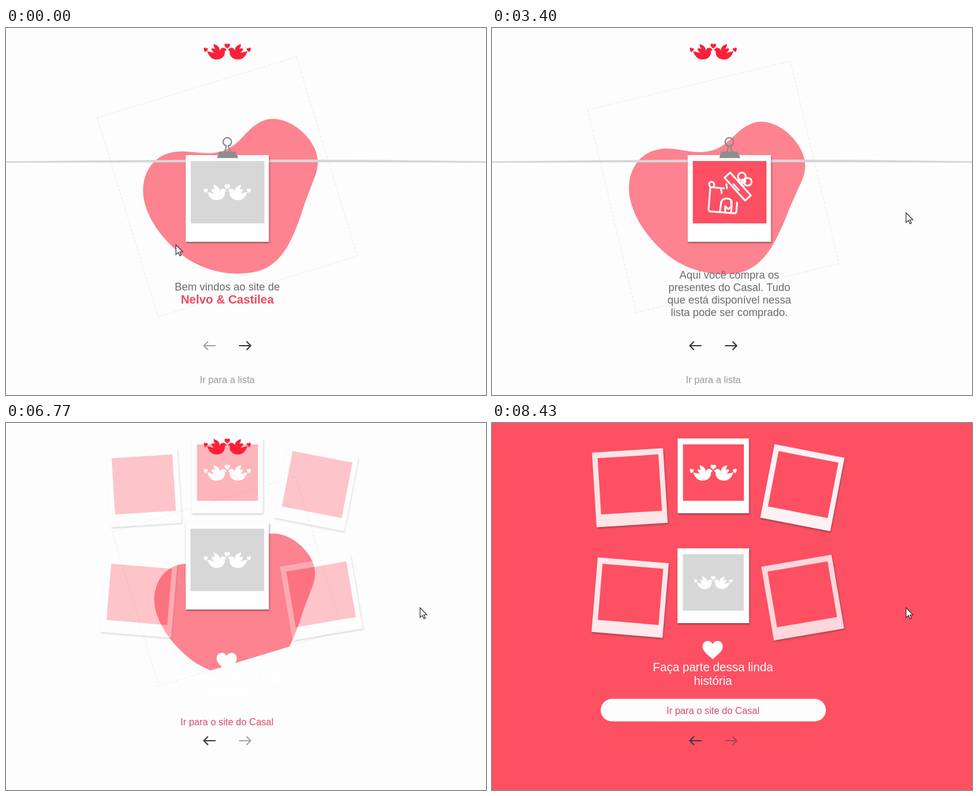
Recreate the animation shown at these times as an HTML page. Size 808 by 618 pixels, loop 8460 ms.

```html
<!DOCTYPE html>
<html lang="pt">
<head>
<meta charset="utf-8">
<style>
  html, body { margin: 0; width: 100%; height: 100%; overflow: hidden; background: #fdfdfd; }
  svg { display: block; width: 808px; height: 618px; font: 18px "Liberation Sans", Arial, sans-serif; }
  text { text-anchor: middle; fill: #6a6a6e; }
  .strong { font-weight: bold; font-size: 20px; fill: #ee4a60; }
  .store { font-weight: bold; font-size: 19px; fill: #0a86de; }
  .light { fill: #fff; }
  .small { font-size: 16px; }
  .shadow { filter: drop-shadow(1.5px 2px 1.5px rgba(50, 40, 50, .5)); }
  .line { fill: none; stroke-linecap: round; stroke-linejoin: round; }
</style>
</head>
<body>
<svg id="stage" viewBox="0 0 808 618"></svg>
<script>
const LOOP = 8460, CENTER = 372.5, WIDTH = 808;
const pink = '#fc838f', red = '#fd5062', grey = '#d7d7d8', paper = '#fefefe';
const STARTS = [1108, 2940, 4405, 5900];
const ANGLES = [-17, 0, -17, 0, -17];

// x, y, rotation, sideways drift, opacity keys at 6770, 7770 and 8430 ms
const FRAMES = [
  [232, 109, -3.6, 0, .32, .7, .85],
  [CENTER, 89, 0, 0, .42, .97, 1],
  [522.5, 109, 11, 0, .32, .87, .93],
  [232.5, 294, 4.8, -9, .32, .78, .88],
  [523, 294, -9.7, 8, .32, .65, .78]
];

const use = (id, x, y, scale, fill) =>
  `<use href="#${id}" transform="translate(${x} ${y}) scale(${scale})" fill="${fill}"/>`;
const lines = (y, ...rows) =>
  rows.map((row, i) => `<text x="${CENTER}" y="${y + i * 21}">${row}</text>`).join('');
const clip = `<g transform="translate(${CENTER} 0)">
  <path class="line" d="M-4 208L-1.5 198.5A7 7 0 1 1 1.5 198.5L5 208" stroke="#858588" stroke-width="2"/>
  <path d="M-14 208H14L18.5 219H-17Z" fill="#8e8e91"/></g>`;
const card = (fill, content, text) => `<g class="slide">
  <rect class="shadow" x="302.5" y="214" width="140" height="146" fill="${paper}"/>
  <rect x="311" y="224" width="124" height="105" fill="${fill}"/>
  ${clip}${content}${text}</g>`;
const doves = use('doves', CENTER, 277, 1, paper);

const gift = `<g class="line" transform="translate(${CENTER} 277)" stroke="#fff" stroke-width="3">
  <path d="M-9-7L-32-9L-35 28Q-35 32-31 32L8 35Q12 35 12 31L13 17M-32-9Q-37-17-30-18Q-24-17-26-11M-14-7L-13 1M-5-14L-4-7M-16 33L-14 18Q-13 10-4 10Q5 11 4 18L3 34M-7 34V23L-2 28L3 24V13"/>
  <rect x="-26" y="-6.5" width="52" height="13" transform="translate(14 -10) rotate(48)"/>
  <path d="M7-14L16-4M14-21L24-10"/>
  <circle cx="21" cy="-27" r="6.5"/><circle cx="31" cy="-18" r="6.5"/><circle cx="24" cy="-19" r="3"/></g>`;

const check = `<g transform="translate(${CENTER} 343)">${use('heart', 0, 0, '.8 .68', '#f5506a')}
  <path class="line" d="M-5 0L-1 4L6-4" stroke="#fff" stroke-width="3"/></g>`;

const arrow = (id, x, flip) => `<path id="${id}" class="line" transform="translate(${x} 535) scale(${flip} 1)"
  d="M-9.5 0H9.5M3-6.5L9.5 0L3 6.5" stroke="#3c3a3e" stroke-width="2.2"/>`;

const stage = document.getElementById('stage');
stage.innerHTML = `
<defs>
  <path id="heart" d="M0 15.5C-6 9-17 3-17-6C-17-12-13-15.5-8.5-15.5C-4-15.5-1-13 0-10C1-13 4-15.5 8.5-15.5C13-15.5 17-12 17-6C17 3 6 9 0 15.5Z"/>
  <g id="dove">
    <path d="M-1-3L-4-6C-8-8-12-6-13-1C-12-7-16-11-23-13C-23-9-22-7-20-5C-23-6-25-6-27-5C-26-2-24 0-22 2L-34-1C-31 7-27 13-18 13C-9 13-3 7-4-1Z"/>
    <use href="#heart" transform="translate(-36.5 -3) rotate(12) scale(.2 .24)"/>
  </g>
  <g id="doves">
    <use href="#dove"/><use href="#dove" transform="scale(-1 1)"/>
    <use href="#heart" transform="translate(0 -9.5) scale(.28)"/>
  </g>
  <clipPath id="cut"><rect id="cutBox" x="-176" y="-176" width="352"/></clipPath>
</defs>
<rect width="808" height="618" fill="#fdfdfd"/>
<g id="blob" clip-path="url(#cut)">
  <rect id="dashes" x="-175.5" y="-175.5" width="351" fill="none" stroke="#e2e2e4" stroke-dasharray="4 3"/>
  <path fill="${pink}" d="M-79-83C-45-83-25-60 10-60C45-60 60-89 96-89C130-87 160-45 160-11C160 4 155 14 148 24C128 50 118 62 106 80C85 108 55 151 10 151C-40 149-85 120-108 85C-130 52-141 20-141-11C-141-50-115-83-79-83Z"/>
</g>
<rect id="redFill" width="808" height="618" fill="${red}"/>
<path id="string" d="M0 224.5Q200 222 404 221.5T808 224.5V227Q600 226 404 226T0 227Z" fill="#d6d4da"/>
${FRAMES.map((f, i) => `<g class="frame">
  <rect class="shadow" x="-60" y="-63" width="120" height="126" fill="${paper}"/>
  <rect x="-51" y="-53" width="102.5" height="95" fill="${red}"/>
  ${i === 1 ? use('doves', 0, -5, 1, paper) : ''}</g>`).join('')}
<g id="header">${use('doves', CENTER, 40, 1, '#f9213a')}</g>
${card(grey, doves, `<text x="${CENTER}" y="442">Bem vindos ao site de</text>
  <text class="strong" x="${CENTER}" y="464">Nelvo &amp; Castilea</text>`)}
${card(red, `<text class="light" x="${CENTER}" y="277" style="font-weight:bold;font-size:28px">-599</text>
  <text class="light" x="${CENTER}" y="299">dias</text>${check}`,
  lines(444, 'Faltam <tspan class="strong">-599 dias</tspan> para o', 'grande dia!'))}
${card(red, gift, lines(422, 'Aqui você compra os', 'presentes do Casal. Tudo', 'que está disponível nessa', 'lista pode ser comprado.'))}
${card(grey, doves, lines(433, 'O <tspan class="store">Zumelo</tspan> notifica o casal do', 'seu presente. Com certeza,', 'ficarão muito felizes!'))}
<g class="slide">
  <rect id="lastPaper" class="shadow" fill="${paper}"/><rect id="lastPhoto" fill="${grey}"/>
  <use id="lastDoves" href="#doves" fill="${paper}"/>
</g>
<g id="closing">
  ${use('heart', 371.5, 382.5, 1, '#fff')}
  <g style="font-size:20px"><text class="light" x="372" y="417.5">Faça parte dessa linda</text>
  <text class="light" x="372" y="440.5">história</text></g>
  <rect x="183" y="464.5" width="379" height="38" rx="19" fill="#fdfdfd"/>
  <text class="small" x="372" y="489.5" style="fill:#d84a68">Ir para o site do Casal</text>
</g>
${arrow('back', 342.5, -1)}${arrow('next', 402.5, 1)}
<text id="toList" class="small" x="372.5" y="598" style="fill:#98989b">Ir para a lista</text>
<path id="cursor" d="M0 0V16.5L4 13L6.6 18.6L9 17.5L6.5 12H11.5Z" fill="#fff" stroke="#302e32" stroke-width="1.2"/>`;

const $ = id => document.getElementById(id);
const all = name => [...stage.querySelectorAll(name)];
const slides = all('.slide'), frames = all('.frame');
const set = (el, attrs) => { for (const k in attrs) el.setAttribute(k, attrs[k]); };
const clamp = v => Math.min(1, Math.max(0, v));
const mix = (a, b, p) => a + (b - a) * p;
const ramp = (t, from, to) => clamp((t - from) / (to - from));
const smooth = v => v * v * (3 - 2 * v);

// CSS "ease": cubic-bezier(.25, .1, .25, 1)
function ease(x) {
  if (x <= 0 || x >= 1) return clamp(x);
  let lo = 0, hi = 1;
  const at = (s, a, b) => 3 * (1 - s) ** 2 * s * a + 3 * (1 - s) * s * s * b + s ** 3;
  for (let i = 0; i < 22; i++) {
    const mid = (lo + hi) / 2;
    if (at(mid, .25, .25) < x) lo = mid; else hi = mid;
  }
  return at(lo, .1, 1);
}

function keyed(t, keys, curve = v => v) {
  const i = keys.findIndex(k => k[0] > t);
  if (i < 0) return keys[keys.length - 1][1];
  if (i === 0) return keys[0][1];
  const [a, b] = [keys[i - 1], keys[i]];
  return mix(a[1], b[1], curve((t - a[0]) / (b[0] - a[0])));
}

function drawBlob(t) {
  let angle = ANGLES[0];
  STARTS.forEach((s, i) => angle += (ANGLES[i + 1] - ANGLES[i]) * ease((t - s + 30) / 1000));
  const shrink = smooth(ramp(t, 6150, 6770));
  const scale = keyed(t, [[6150, 1], [6770, .92], [6860, .92], [7450, 6.5]], smooth);
  const height = mix(351, 294, shrink);
  set($('blob'), { transform: `translate(${CENTER + 7.5 * shrink} ${267.5 + 24 * shrink}) rotate(${angle}) scale(${scale})` });
  set($('dashes'), { height });
  set($('cutBox'), { height: height + 1 });
  set($('redFill'), { opacity: smooth(ramp(t, 7800, 8380)) });
}

function drawFrames(t, settle) {
  FRAMES.forEach(([x, y, turn, drift, a, b, c], i) => set(frames[i], {
    transform: `translate(${x + drift * (1 - settle)} ${y}) rotate(${turn})`,
    opacity: keyed(t, [[6080, 0], [6770, a], [7770, b], [8430, c]])
  }));
}

function drawLastCard(t, settle) {
  const lift = 46 * smooth(ramp(t, 5950, 6550));
  const width = mix(140, 120.5, settle), height = mix(146, 126, settle);
  const middle = mix(287 - lift, 274, 1 - (1 - settle) ** 1.5);
  const photoWidth = mix(124, 102.5, settle), top = middle - height / 2;
  set($('lastPaper'), { x: CENTER - width / 2, y: top, width, height });
  set($('lastPhoto'), { x: CENTER - photoWidth / 2, y: top + 10, width: photoWidth, height: mix(105, 95, settle) });
  set($('lastDoves'), { transform: `translate(${CENTER} ${top + mix(63, 58, settle)}) scale(${mix(1, .82, settle)})` });
}

function draw(t) {
  const position = STARTS.reduce((sum, s) => sum + ease((t - s) / 600), 0);
  const settle = smooth(ramp(t, 6770, 8430));
  slides.forEach((el, i) => set(el, {
    transform: `translate(${(i - position) * WIDTH} 0)`,
    visibility: Math.abs(i - position) < 1 ? 'visible' : 'hidden'
  }));
  drawBlob(t);
  drawFrames(t, settle);
  drawLastCard(t, settle);

  set($('closing'), { transform: `translate(0 ${20 * (1 - settle)})`, opacity: ramp(t, 6100, 6650) });
  set($('string'), { opacity: 1 - ramp(t, 5950, 6500) });
  set($('header'), { opacity: 1 - ramp(t, 6790, 7100) });
  set($('toList'), { opacity: 1 - ramp(t, 5900, 6250) });
  set($('back'), { opacity: mix(.45, 1, ramp(t, STARTS[0], STARTS[0] + 200)) });
  set($('next'), { opacity: mix(1, .45, ramp(t, STARTS[3], STARTS[3] + 200)) });

  const x = keyed(t, [[0, 286], [800, 398], [1150, 398], [1630, 370], [1900, 420], [2770, 697]], smooth);
  const y = keyed(t, [[0, 365], [800, 529], [1150, 529], [1630, 340], [1900, 572], [2770, 311]], smooth);
  set($('cursor'), { transform: `translate(${x} ${y})` });
}

const begin = performance.now();
function tick() {
  draw((performance.now() - begin) % LOOP);
  requestAnimationFrame(tick);
}
tick();
</script>
</body>
</html>
```
